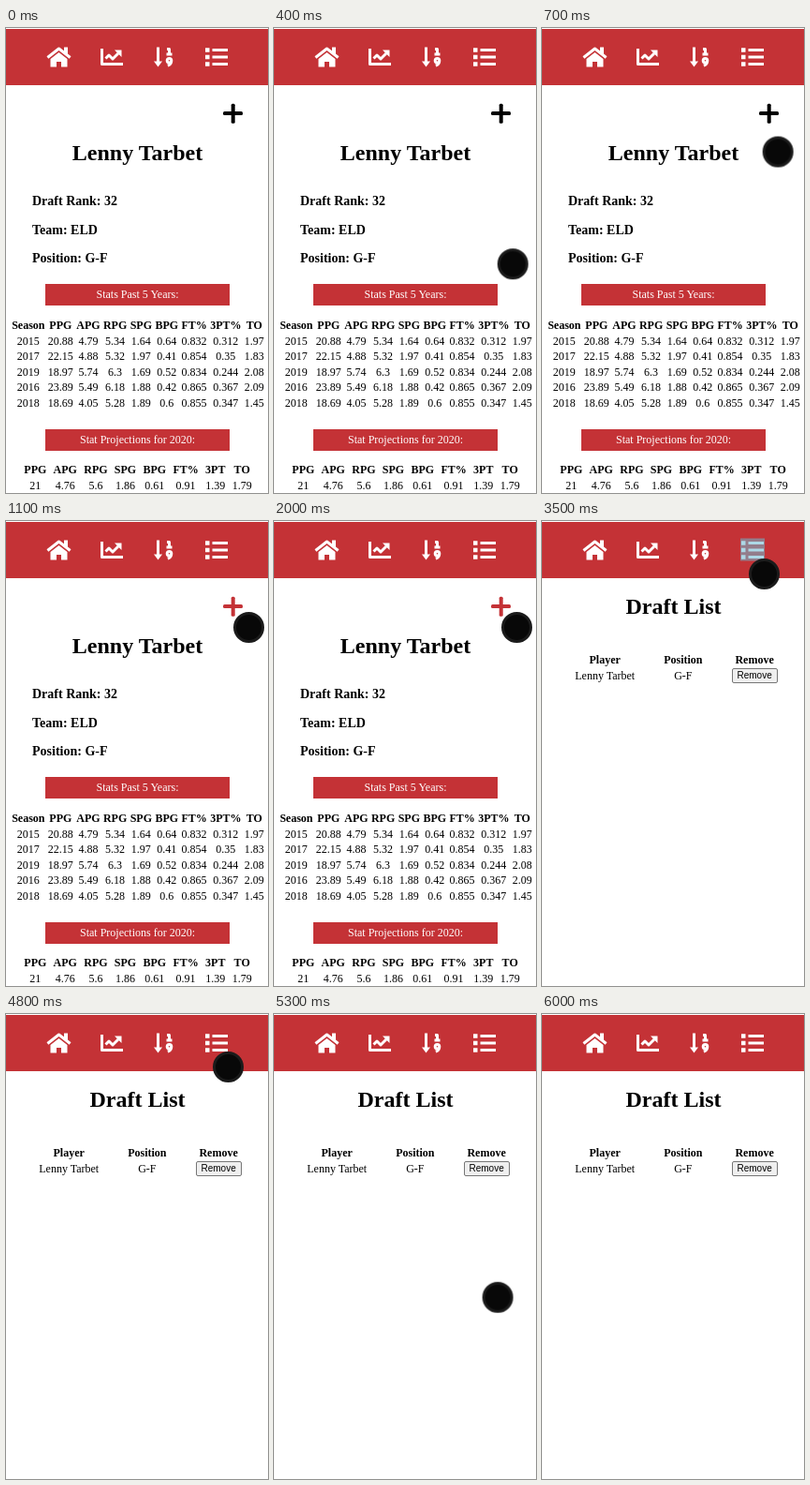
An HTML page that plays this animation: 280 by 496 pixels, repeating every 6100 ms.

```html
<!DOCTYPE html>
<html lang="en">
<head>
<meta charset="utf-8">
<title>Draft helper</title>
<style>
  :root { --red: #c43236; --loop: 6100ms infinite; }
  html, body { margin: 0; width: 100%; height: 100%; overflow: hidden; background: #fff; }
  body { position: relative; font: 12px/16.5px "Liberation Serif", "Times New Roman", serif; color: #000; }
  header, h1, section, .info, .bar, .table, .plus, .pointer, svg { position: absolute; margin: 0; }

  header { top: 1px; width: 280px; height: 59.7px; background: var(--red); }
  svg { top: 18px; height: 24px; overflow: visible; fill: #fff; }
  svg path { stroke: none; }
  svg .line { fill: none; stroke: #fff; stroke-width: 3; stroke-linejoin: round; }
  .list .line { stroke: inherit; }
  .list .line + .line { stroke-width: 4.5; }

  section { inset: 0; }
  h1 { width: 281px; font-size: 24px; line-height: 26px; text-align: center; }
  .info { top: 170px; left: 28px; font-size: 14px; font-weight: bold; line-height: 30.5px; }
  .bar { left: 42px; width: 197px; line-height: 23.5px; text-align: center; color: #fff; background: var(--red); }

  .table { width: 282px; }
  table { margin: auto; border-collapse: separate; border-spacing: 0; text-align: center; white-space: nowrap; }
  th, td { padding: 0 calc(var(--gap) / 2); }
  .button {
    display: inline-block; vertical-align: top; margin-top: .5px; padding: 0 5px;
    border: 1px solid #767676; border-radius: 2px; background: #efefef;
    font: 10px/14px "Liberation Sans", Arial, sans-serif;
  }

  .plus { left: 232px; top: 80.5px; width: 21px; height: 21px; color: #000; animation: added var(--loop) step-end; }
  .plus::before, .plus::after {
    content: ""; position: absolute; top: 8.2px; width: 21px; height: 4.4px;
    border-radius: 1.5px; background: currentColor;
  }
  .plus::after { transform: rotate(90deg); }

  .pointer {
    left: -16.5px; top: -16.5px; width: 27px; height: 27px; border: 3px solid #1b1b1b;
    border-radius: 50%; background: #080808; animation: travel var(--loop);
  }
  .player { animation: leave var(--loop) step-end; }
  .draft { animation: arrive var(--loop) step-end; }
  .tap { opacity: 0; animation: tap var(--loop) linear; }
  .list { stroke: #fff; animation: tint var(--loop) linear; }

  @keyframes added { 18% { color: var(--red); } }
  @keyframes leave { 54% { visibility: hidden; } 100% { visibility: hidden; } }
  @keyframes arrive { 0% { visibility: hidden; } 54% { visibility: visible; } }
  @keyframes tap { 0%, 50.7% { opacity: 0; } 50.8%, 57.4% { opacity: 1; } 64%, 100% { opacity: 0; } }
  @keyframes tint { 0%, 50.7% { stroke: #fff; } 50.8%, 57.4% { stroke: #add8e6; } 64%, 100% { stroke: #fff; } }
  @keyframes travel {
    0%, 1.6% { transform: translate(262px, 520px); animation-timing-function: ease-out; }
    11.4% { transform: translate(251.5px, 132px); animation-timing-function: ease-out; }
    18%, 39% { transform: translate(259px, 113px); animation-timing-function: ease-in-out; }
    45.8%, 80.3% { transform: translate(237px, 56px); animation-timing-function: ease-in; }
    90%, 100% { transform: translate(240px, 520px); }
  }
</style>
</head>
<body>
<header>
  <svg style="left: 43px" width="27">
    <path class="line" d="M1.4 12.5 13.5 3 25.6 12.5"/>
    <path d="M4.5 14 13.5 7l9 7v8.5H16V17H11v5.5H4.5ZM19 1.5h4V10l-4-3Z"/>
  </svg>
  <svg style="left: 100.5px" width="24">
    <path class="line" d="M1.5 3V19.5H24M5.5 13.5 9 10l4 4 6-6"/>
    <path d="M15 4.5h7.5V12Z"/>
  </svg>
  <svg style="left: 158px" width="21">
    <path class="line" d="M4.5 1.5V17M14 3.5h2.5V9M13.5 9h6"/>
    <path class="line" d="M18.8 15.7a2.3 2.3 0 1 0-4.6 0 2.3 2.3 0 0 0 4.6 0q0 4-4 5.3"/>
    <path d="M0 16.5H9l-4.5 6Z"/>
  </svg>
  <svg class="list" style="left: 213px" width="24">
    <rect class="tap" x="-1" y="-.5" width="26" height="24" stroke="none" fill="#7aa6bb" fill-opacity=".65"/>
    <path class="line" d="M7.5 4.5H24M7.5 12H24M7.5 19.5H24"/>
    <path class="line" d="M0 4.5h4.5M0 12h4.5M0 19.5h4.5"/>
  </svg>
</header>

<section class="player">
  <div class="plus"></div>
  <h1 style="top: 120px">Lenny Tarbet</h1>
  <div class="info">Draft Rank: 32<br>Team: ELD<br>Position: G-F</div>
  <div class="bar" style="top: 272.5px">Stats Past 5 Years:</div>
  <div class="table" style="top: 309px; --gap: 3.4px">
    <table>
      <tr><th>Season<th>PPG<th>APG<th>RPG<th>SPG<th>BPG<th>FT%<th>3PT%<th>TO
      <tr><td>2015<td>20.88<td>4.79<td>5.34<td>1.64<td>0.64<td>0.832<td>0.312<td>1.97
      <tr><td>2017<td>22.15<td>4.88<td>5.32<td>1.97<td>0.41<td>0.854<td>0.35<td>1.83
      <tr><td>2019<td>18.97<td>5.74<td>6.3<td>1.69<td>0.52<td>0.834<td>0.244<td>2.08
      <tr><td>2016<td>23.89<td>5.49<td>6.18<td>1.88<td>0.42<td>0.865<td>0.367<td>2.09
      <tr><td>2018<td>18.69<td>4.05<td>5.28<td>1.89<td>0.6<td>0.855<td>0.347<td>1.45
    </table>
  </div>
  <div class="bar" style="top: 427.5px">Stat Projections for 2020:</div>
  <div class="table" style="top: 463px; --gap: 7.3px">
    <table>
      <tr><th>PPG<th>APG<th>RPG<th>SPG<th>BPG<th>FT%<th>3PT<th>TO
      <tr><td>21<td>4.76<td>5.6<td>1.86<td>0.61<td>0.91<td>1.39<td>1.79
    </table>
  </div>
</section>

<section class="draft">
  <h1 style="top: 78px">Draft List</h1>
  <div class="table" style="top: 140px; width: 287px; --gap: 31px">
    <table>
      <tr><th>Player<th>Position<th>Remove
      <tr><td>Lenny Tarbet<td>G-F<td><span class="button">Remove</span>
    </table>
  </div>
</section>

<div class="pointer"></div>
</body>
</html>
```
